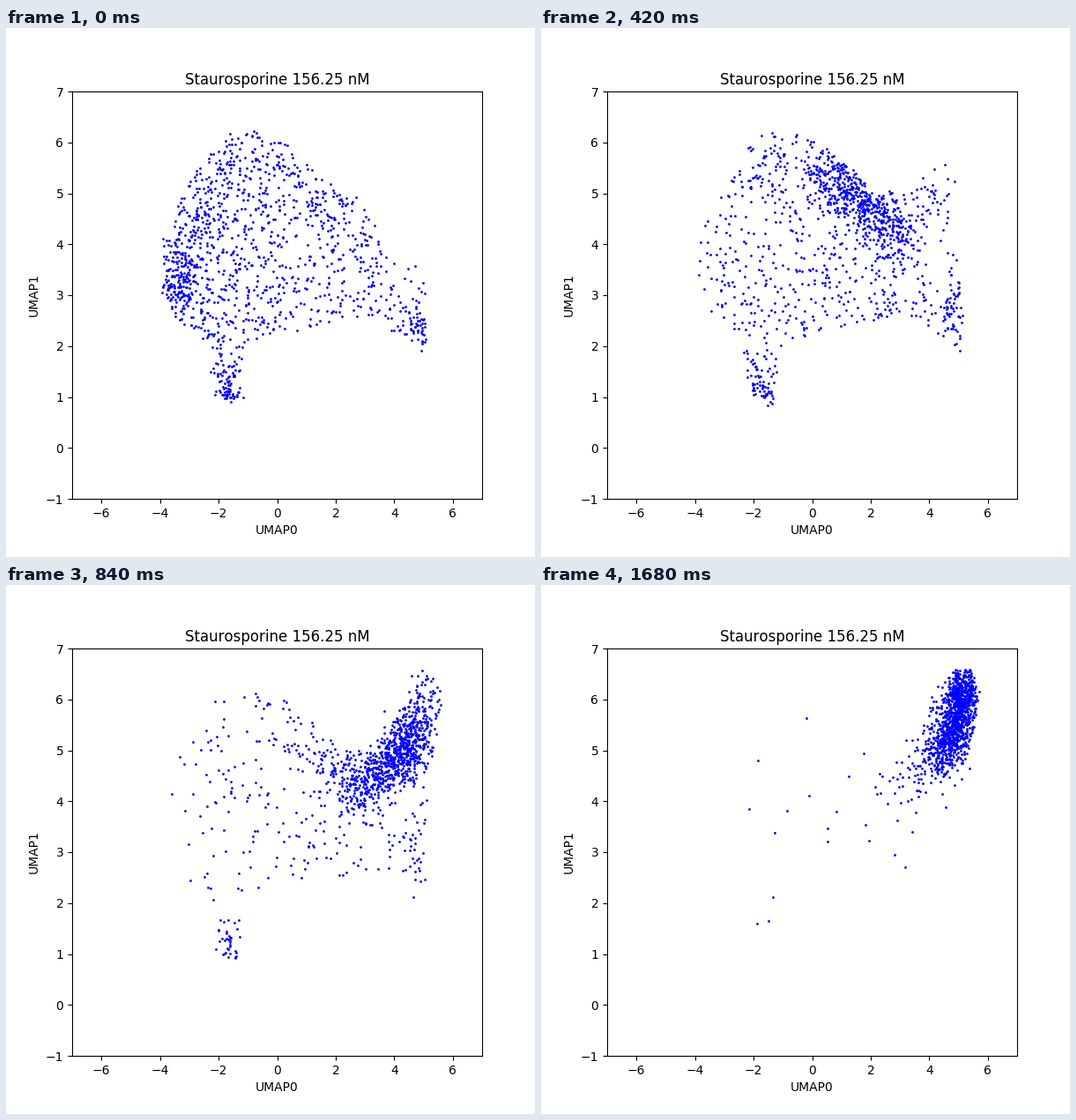
Write a matplotlib script that moves like this. It is 600 px wide and 600 px high and loops after 1.82 s.

```python
import numpy as np
import matplotlib.pyplot as plt
from matplotlib.animation import FuncAnimation
from matplotlib.path import Path

FRAMES, STEP = 13, 140
CELLS = 1250

# Region the cells stay inside, in data units.
OUTLINE = Path([
    (-3.9, 4.1), (-3.9, 3.1), (-3.4, 2.55), (-2.4, 2.1), (-2.1, 1.0),
    (-1.3, 0.88), (-1.1, 2.1), (0.5, 2.3), (3.4, 2.6), (5.1, 1.9),
    (5.0, 3.5), (5.4, 5.0), (5.65, 6.1), (5.4, 6.6), (4.5, 6.6),
    (3.5, 5.5), (2.9, 5.0), (2.2, 4.95), (1.3, 5.5), (0.3, 6.0),
    (-1.3, 6.3), (-2.3, 5.9), (-3.1, 5.2),
])

# Route an affected cell takes, from the left edge to the upper right.
ROUTE = np.array([
    (-3.4, 3.2), (-1.5, 5.7), (0.3, 5.45), (1.4, 5.0),
    (2.8, 4.2), (4.1, 4.9), (4.8, 5.3), (5.2, 6.2),
])


def inside(x, y, n):
    """First n of the candidate points that lie in the outline."""
    pts = np.column_stack([x, y])
    return pts[OUTLINE.contains_points(pts)][:n]


def gauss(rng, n, x, y, sx, sy):
    size = 8 * n + 20
    return inside(rng.normal(x, sx, size), rng.normal(y, sy, size), n)


def blob(rng, n, u):
    """Even spread over the main body, thinning from the left with time."""
    size = 8 * n + 20
    x = -4 + 8 * rng.random(size) ** (1 / (0.8 + 0.25 * u))
    y = rng.uniform(0.8, 6.4, size)
    keep = y + 1.2 * x < 8.3
    return inside(x[keep], y[keep], n)


def wave(rng, n, u):
    """Cells strung along the route around a decelerating centre."""
    size = 8 * n + 20
    s = rng.normal(7.1 * (1 - np.exp(-u / 2.5)), 0.9, size)
    stops = np.arange(len(ROUTE))
    x, y = (np.interp(s, stops, axis) for axis in ROUTE.T)
    return inside(x + rng.normal(0, 0.32, size),
                  y + rng.normal(0, 0.32, size), n)


def cloud(i):
    rng = np.random.default_rng(100 + i)
    u = i / 2
    healthy = 0.82 * np.exp(-(u / 2.6) ** 1.6)
    fade = min(1, 2.5 * healthy)
    foot, tail = round(75 * fade), round(50 * fade)
    body = round(CELLS * healthy) - foot - tail
    pts = np.vstack([
        blob(rng, max(body, 0), u),
        gauss(rng, foot, 4.8, 2.5 + 0.05 * u ** 2, 0.35, 0.4 + 0.1 * u),
        gauss(rng, tail, -1.65, 1.1, 0.3, 0.35),
        wave(rng, round(CELLS * (1 - healthy)), u),
    ])
    return pts + rng.normal(0, (0.05, 0.04), pts.shape)


plt.rcParams["text.kerning_factor"] = 6
fig, ax = plt.subplots(figsize=(6, 6), dpi=100)
ax.set(xlim=(-7, 7), ylim=(-1, 7), xlabel="UMAP0", ylabel="UMAP1",
       xticks=range(-6, 7, 2), yticks=range(-1, 8),
       title="Staurosporine 156.25 nM")
dots, = ax.plot([], [], ".", color="blue", ms=2)


def update(i):
    dots.set_data(*cloud(i).T)
    return dots,


anim = FuncAnimation(fig, update, frames=FRAMES, interval=STEP,
                     repeat=True, repeat_delay=0)
plt.show()
```
